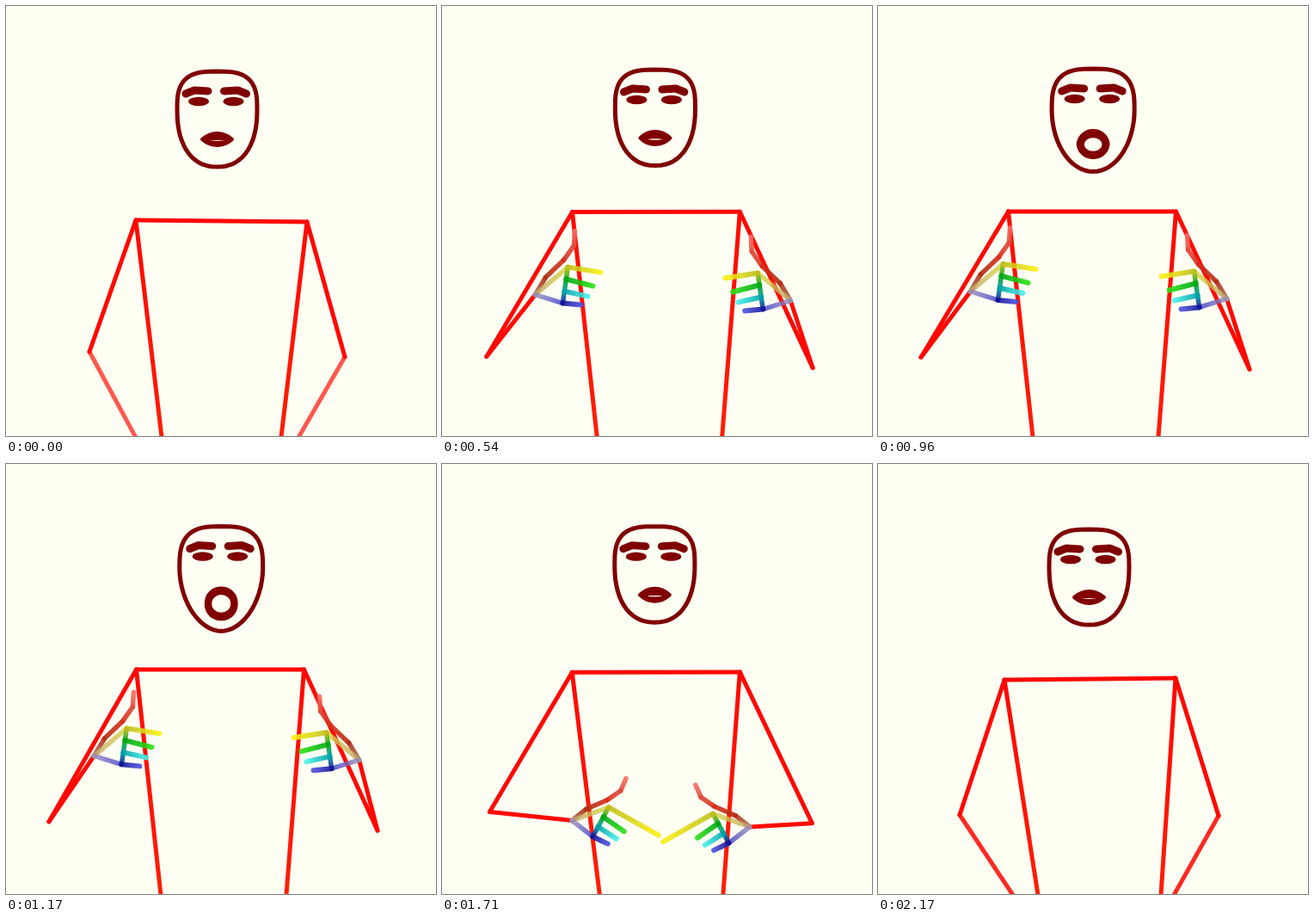
An HTML page with a canvas for the animation above (2210 ms loop, 500 by 500 pixels).

```html
<!DOCTYPE html>
<html lang="en">
<head>
<meta charset="utf-8">
<title>Signing figure</title>
<style>
  html, body { margin: 0; width: 100%; height: 100%; overflow: hidden; background: #fffff4; }
  canvas { display: block; width: 100vmin; height: 100vmin; }
</style>
</head>
<body>
<canvas id="stage" width="500" height="500"></canvas>
<script>
const ctx = document.getElementById('stage').getContext('2d');
const LOOP = 2210, FPS = 24, STEPS = 53, TAU = Math.PI * 2;
const PAPER = '#fffff4', FACE = '#800000', RED = [255, 8, 0];

// Key poses, left side first; hips are the x where the torso leaves the stage
const rest = { shoulders: [[151, 249], [350, 251]], hips: [181, 320],
  elbows: [[97, 402], [394, 408]], wrists: [[170, 537], [318, 540]], solid: .68 };
const reach = { shoulders: [[152, 243], [345, 242]], hips: [182, 323],
  elbows: [[67, 401], [423, 405]], wrists: [[135, 367], [384, 360]], solid: .85 };
const up = { shoulders: [[151.5, 239], [346.5, 239]], hips: [180, 326],
  elbows: [[50, 411.5], [432, 424]], wrists: [[108, 335], [405, 342]], solid: 1 };
const fall = { shoulders: [[151, 247], [346, 246]], hips: [188, 328],
  elbows: [[63, 399], [428, 411]], wrists: [[215, 530], [288, 536]], solid: 1 };
const settle = { shoulders: [[147, 251], [346, 249]], hips: [186, 329],
  elbows: [[95, 408], [396, 409]], wrists: [[176, 530], [325, 535]], solid: .86 };

const timeline = [[0, rest], [9, reach], [14, up], [37, up], [46, fall], [52, settle]];

// Hand in its upright attitude, relative to the wrist, x pointing inward
const hand = {
  thumb: [[0, 0], [12, -20], [33, -40], [45, -57], [46, -74]],
  first: [38, -32], last: [32, 10], lastCurled: [48, -1],
  tips: [[76, -26], [67, -10], [61, 2], [53, 12]]
};
const thumbHues = [[165, 110, 90], [180, 45, 20], [215, 45, 25], [225, 75, 60], [250, 110, 100]];
const fingerHues = [
  [[190, 190, 30], [250, 240, 20]], [[0, 165, 20], [40, 225, 20]],
  [[0, 160, 165], [70, 240, 235]], [[20, 20, 150], [75, 80, 225]]
];

const lerp = (a, b, u) => a + (b - a) * u;
const mix = (a, b, u) => a.map((v, i) => lerp(v, b[i], u));
const css = (c, alpha) => `rgba(${c.map(Math.round).join()},${alpha})`;

function ease(from, to, n) {
  const u = Math.min(1, Math.max(0, (n - from) / (to - from)));
  return u * u * (3 - 2 * u);
}

// Blends numbers and nested points of two poses
function blend(a, b, u) {
  if (typeof a === 'number') return lerp(a, b, u);
  if (Array.isArray(a)) return a.map((v, i) => blend(v, b[i], u));
  return Object.fromEntries(Object.keys(a).map(k => [k, blend(a[k], b[k], u)]));
}

function poseAt(n) {
  const next = Math.max(1, timeline.findIndex(([step]) => step >= n));
  const [from, a] = timeline[next - 1], [to, b] = timeline[next];
  const pose = blend(a, b, ease(from, to, n));

  // While raised, the hands swing out and in and sink a little
  const held = ease(9, 14, n) * (1 - ease(37, 46, n));
  const spread = 6 * held * Math.cos(TAU * (n - 27) / 17);
  const sink = 7 * held * Math.sin(TAU * (n - 25) / 28);
  [0, 1].forEach(i => {
    const drop = i ? sink / 2 : sink;
    pose.wrists[i][0] += i ? spread : -spread;
    pose.wrists[i][1] += drop;
    pose.elbows[i][1] += drop;
  });
  return pose;
}

// Straight stroke, or a cubic one when two handles are given
function line(a, b, from, to = from, width = 5, alpha = 1, handles = [a, b]) {
  const g = ctx.createLinearGradient(...a, ...b);
  g.addColorStop(0, css(from, alpha));
  g.addColorStop(1, css(to, alpha));
  ctx.strokeStyle = g;
  ctx.lineWidth = width;
  ctx.beginPath();
  ctx.moveTo(...a);
  ctx.bezierCurveTo(...handles[0], ...handles[1], ...b);
  ctx.stroke();
}

function ellipse(x, y, rx, ry, fill) {
  ctx.fillStyle = fill;
  ctx.beginPath();
  ctx.ellipse(x, y, rx, ry, 0, 0, TAU);
  ctx.fill();
}

function drawOutline(x, top, bottom, halfWidth, open) {
  const waist = lerp(top, bottom, .4);
  const bulge = (v, p) => Math.sign(v) * Math.abs(v) ** (2 / p);
  ctx.beginPath();
  for (let i = 0; i < 60; i++) {
    const c = Math.cos(i / 60 * TAU), s = Math.sin(i / 60 * TAU);
    const power = s < 0 ? 3 : 2.3 - .4 * open;
    const reachY = s < 0 ? waist - top : bottom - waist;
    ctx.lineTo(x + halfWidth * bulge(c, power), waist + reachY * bulge(s, power));
  }
  ctx.closePath();
  ctx.lineWidth = 5;
  ctx.stroke();
}

function drawMouth(x, top, open) {
  const ry = 9 + 11 * open, y = top + ry, a = 17.5, b = (ry - 2) * 4 / 3;
  const q = a * (.4 + .6 * open);
  ctx.fillStyle = FACE;
  ctx.lineWidth = 4;
  ctx.beginPath();
  ctx.moveTo(x - a, y);
  ctx.bezierCurveTo(x - q, y - b, x + q, y - b, x + a, y);
  ctx.bezierCurveTo(x + q, y + b, x - q, y + b, x - a, y);
  ctx.fill();
  ctx.stroke();
  ellipse(x, y + 1.5 - 1.5 * open, 8 + 3 * open, .5 + 10 * open ** 1.3, PAPER);
}

function drawHead(n) {
  const open = Math.exp(-(((n - 27) / 8) ** 2));
  const x = 245.5 + 4.8 * Math.sin(Math.PI * n / 52) ** 2;
  const y = 109 + 2 * Math.cos(TAU * n / 17.3);
  ctx.strokeStyle = FACE;
  drawOutline(x, y - 35, y + 76 + 11 * open, 46.5 + 2 * open, open);
  [[x - 21.5, -1], [x + 19, 1]].forEach(([ex, side]) => {
    ellipse(ex, y, 12, 5.2, FACE);
    ctx.lineWidth = 9;
    ctx.beginPath();
    ctx.moveTo(ex - side * 11, y - 12);
    ctx.lineTo(ex + side * 5, y - 13);
    ctx.lineTo(ex + side * 15, y - 9);
    ctx.stroke();
  });
  drawMouth(x, y + 35, open);
}

function drawHand(n, wrist, side) {
  const lowering = ease(36, 46, n), curl = 1 - ease(9, 13, n);
  const turn = 25 * ease(28, 46, n) * Math.PI / 180, size = 1 - .17 * lowering;
  const cos = Math.cos(turn) * size, sin = Math.sin(turn) * size;
  const at = ([x, y]) => [wrist[0] + side * (x * cos - y * sin), wrist[1] + x * sin + y * cos];
  const last = mix(hand.last, hand.lastCurled, curl);
  const knuckle = i => mix(hand.first, last, i / 3);

  const thumb = hand.thumb.map(at);
  for (let i = 0; i < 4; i++) line(thumb[i], thumb[i + 1], thumbHues[i], thumbHues[i + 1], 5.5, .9);

  line(wrist, at(knuckle(0)), [195, 165, 110], [215, 215, 60], 5.5, .8);
  line(wrist, at(last), [150, 140, 185], [60, 60, 200], 5.5, .8);
  for (let i = 0; i < 3; i++) {
    line(at(knuckle(i)), at(knuckle(i + 1)), fingerHues[i][0], fingerHues[i + 1][0], 5.5, .9);
  }
  fingerHues.forEach(([from, to], i) => {
    const base = knuckle(i), stretch = i ? 1 : 1 + turn * 2.5;
    const along = (u, hook) => {
      const straight = mix(base, hand.tips[i], u * stretch);
      const hooked = [base[0] + hook[0], base[1] + hook[1]];
      return at(mix(straight, hooked, curl));
    };
    const handles = [along(1 / 3, [24, -4]), along(2 / 3, [24, 8])];
    line(at(base), along(1, [12, 10]), from, to, 6, .9, handles);
  });
}

function draw(n) {
  ctx.fillStyle = PAPER;
  ctx.fillRect(0, 0, 500, 500);
  ctx.lineCap = ctx.lineJoin = 'round';
  drawHead(n);

  const { shoulders, hips, elbows, wrists, solid } = poseAt(n);
  line(shoulders[0], shoulders[1], RED);
  shoulders.forEach((shoulder, i) => {
    line(shoulder, [hips[i], 501], RED, [255, 30, 5]);
    line(shoulder, elbows[i], RED);
    line(elbows[i], wrists[i], RED, RED, 5, solid);
  });
  if (n > 9 && n < 44) drawHand(n, wrists[0], 1);
  if (n > 7 && n < 47) drawHand(n, wrists[1], -1);
}

const start = performance.now();
function tick() {
  const t = (performance.now() - start) % LOOP;
  draw(Math.min(STEPS - 1, Math.floor((t + 5) * FPS / 1000)));
  requestAnimationFrame(tick);
}
tick();
</script>
</body>
</html>
```
